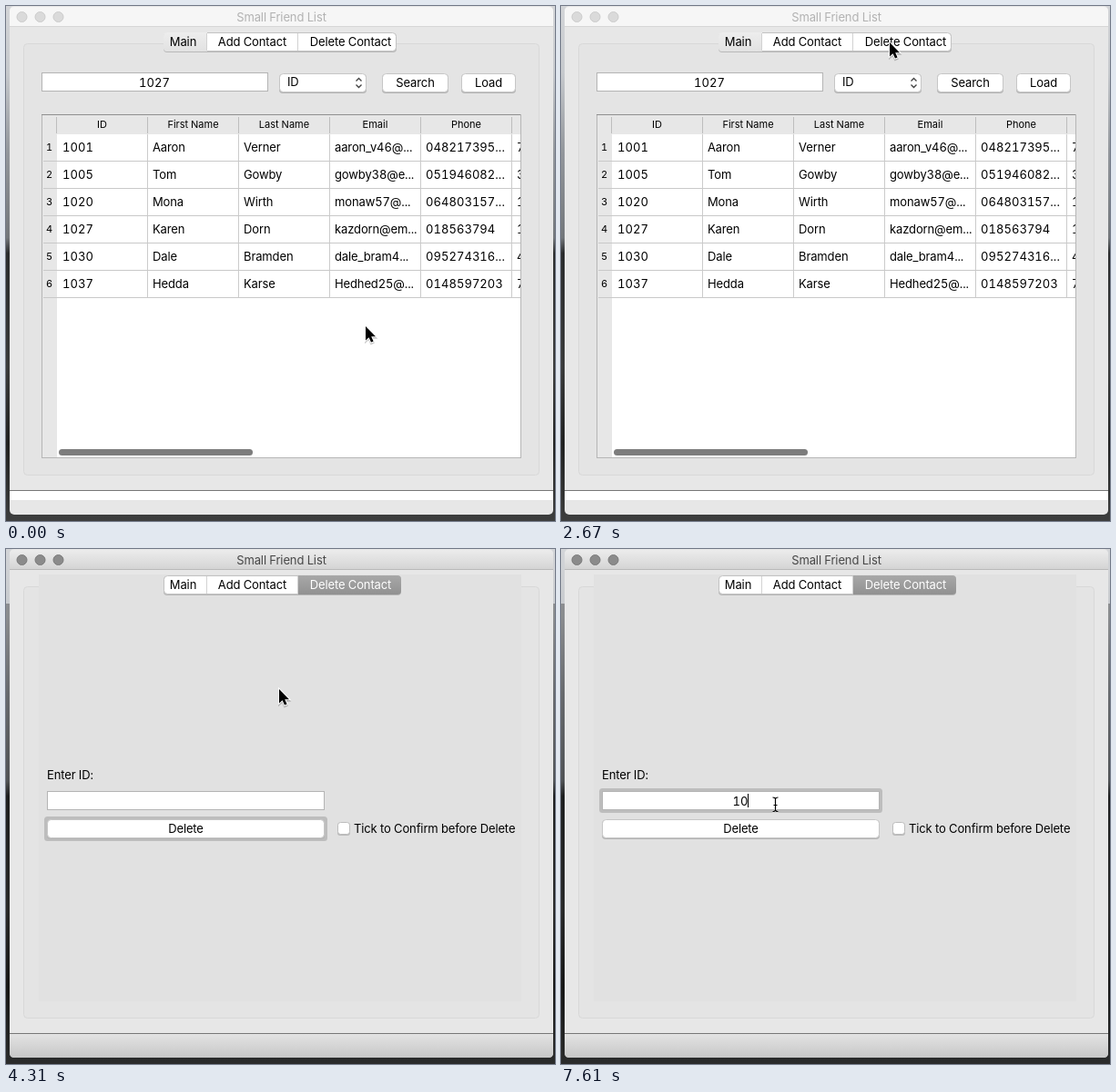
Write an HTML page that moves like this. It is 603 px wide and 566 px high and loops after 8000 ms.

```html
<!DOCTYPE html>
<html lang="en">
<head>
<meta charset="utf-8">
<title>Contacts</title>
<style>
html, body { margin: 0; width: 100%; height: 100%; overflow: hidden; background: #222; }
svg { display: block; width: 603px; height: 566px; }
text {
  font: 13px Inter, "Open Sans", sans-serif;
  font-feature-settings: "tnum";
  letter-spacing: -0.12px;
  white-space: pre;
}
.small { font-size: 11px; letter-spacing: 0; }
.num { letter-spacing: 0.05px; }
.mid { text-anchor: middle; }
</style>
</head>
<body>
<svg id="stage" viewBox="0 0 603 566"></svg>
<script>
const LOOP = 8000;
const stage = document.getElementById('stage');

// Drawing helpers
const rect = (x, y, w, h, fill, extra = '') =>
  `<rect x="${x}" y="${y}" width="${w}" height="${h}" fill="${fill}" ${extra}/>`;
const framed = (x, y, w, h, fill, stroke, r = 0) =>
  rect(x + 0.5, y + 0.5, w - 1, h - 1, fill, `stroke="${stroke}" rx="${r}"`);
const path = (d, fill, extra = '') => `<path d="${d}" fill="${fill}" ${extra}/>`;
const text = (s, x, y, cls = '', fill = '#000') =>
  `<text x="${x}" y="${y}" class="${cls}" fill="${fill}">${s}</text>`;
const label = (s, x, y, fill) => text(s, x, y, 'mid', fill);
const hline = (x, y, w, color) => rect(x, y, w, 1, color);
const vline = (x, y, h, color) => rect(x, y, 1, h, color);
const group = (id, body) => `<g id="${id}">${body}</g>`;
const gradient = (id, stops) =>
  `<linearGradient id="${id}" x2="0" y2="1">` + stops.map(([at, color]) =>
    `<stop offset="${at}" stop-color="${color}"/>`).join('') + '</linearGradient>';

const ring = (x, y, w, h) => rect(x - 3, y - 3, w + 6, h + 6, '#bdbdbd', 'rx="3.5"');
const field = (x, y, w, h) => framed(x, y, w, h, '#fff', '#b4b4b4');
const button = (x, y, w, h, s) =>
  rect(x, y + 1, w, h, '#b3b3b3', 'rx="4"') +
  framed(x, y, w, h, '#fff', '#c6c6c6', 4) +
  (s ? label(s, x + w / 2, y + 15) : '');

// Tab segment with rounding on the left and/or right side
function segment(x1, x2, left, right, fill) {
  const a = left ? 4 : 0, b = right ? 4 : 0;
  return path(`M${x1 + a} 29H${x2 - b}q${b} 0 ${b} ${b}V${50 - b}q0 ${b} ${-b} ${b}` +
    `H${x1 + a}q${-a} 0 ${-a} ${-a}V${29 + a}q0 ${-a} ${a} ${-a}z`, fill);
}

function tabs(x1, x2, mainFill, deleteFill, mainText, deleteText) {
  return rect(x1, 30, x2 - x1, 21, '#b8b8b8', 'rx="4"') +
    framed(x1, 29, x2 - x1, 21, '#fff', '#c2c2c2', 4) +
    (mainFill ? segment(x1, 221, true, false, mainFill) : '') +
    (deleteFill ? segment(321, x2, false, true, deleteFill) : '') +
    vline(220, 30, 19, '#d2d2d2') + vline(320, 30, 19, '#d2d2d2') +
    label('Main', 194.5, 44, mainText) +
    label('Add Contact', 270.5, 44) +
    label('Delete Contact', 378.5, 44, deleteText);
}

function chrome(active) {
  const light = active ? '#8b8b8b' : '#dadada';
  const edge = active ? '#7b7b7b' : '#cccccc';
  return rect(4, 0, 597, 559, '#e7e7e7', 'rx="5"') +
    path('M4 23V6q0 -5 5 -5H596q5 0 5 5V23z', active ? 'url(#bar)' : '#f6f6f6') +
    hline(4, 22, 597, active ? '#b9b9b9' : '#d6d6d6') +
    [17.5, 37.5, 57.5].map(x =>
      `<circle cx="${x}" cy="12" r="5.5" fill="${light}" stroke="${edge}"/>`).join('') +
    label('Small Friend List', 302.5, 17, active ? '#474747' : '#b2b2b2') +
    framed(19, 41, 567, 475, '#e4e4e4', '#d8d8d8', 4) +
    (active
      ? path('M4 533H601V554q0 5 -5 5H9q-5 0 -5 -5z', 'url(#foot)')
      : rect(4, 533, 597, 10, '#fff')) +
    hline(4, 532, 597, '#777');
}

const heads = ['ID', 'First Name', 'Last Name', 'Email', 'Phone'];
const people = [
  ['1001', 'Aaron', 'Verner', 'aaron_v46@...', '048217395...', '7'],
  ['1005', 'Tom', 'Gowby', 'gowby38@e...', '051946082...', '3'],
  ['1020', 'Mona', 'Wirth', 'monaw57@...', '064803157...', '1'],
  ['1027', 'Karen', 'Dorn', 'kazdorn@em...', '018563794', '1'],
  ['1030', 'Dale', 'Bramden', 'dale_bram4...', '095274316...', '4'],
  ['1037', 'Hedda', 'Karse', 'Hedhed25@...', '0148597203', '7']
];

function table() {
  let out = framed(39, 119, 527, 378, '#fff', '#b6b6b6') +
    rect(40, 120, 525, 21, '#e7e7e7') + rect(40, 120, 16, 376, '#e7e7e7') +
    hline(39, 119, 527, '#8f8f8f');
  for (let c = 0; c < 6; c++) {
    const x = 55 + 100 * c;
    out += vline(x, 122, 18, '#bdbdbd');
    if (c) out += vline(x, 141, 180, '#cbcbcb');
    if (heads[c]) out += text(heads[c], x + 50.5, 134, 'small mid');
  }
  people.forEach((person, r) => {
    const y = 160 + 30 * r;
    out += hline(41, y + 10, 524, '#c9c9c9') + text(r + 1, 47.5, y - 1, 'small mid');
    person.forEach((s, c) => {
      out += text(s, c ? 61 + 100 * c : 62, y, /^\d/.test(s) ? 'num' : '');
    });
  });
  return `<g clip-path="url(#tableClip)">${out}</g>` +
    vline(565, 119, 378, '#b6b6b6') +
    rect(58, 487, 213, 7, '#7d7d7d', 'rx="3.5"');
}

function mainPane(active) {
  const arrows = `fill="none" stroke="${active ? '#fff' : '#444'}" stroke-width="1.4"`;
  return (active
      ? tabs(170, 429, 'url(#picked)', 'url(#pressed)', '#fff', '#000')
      : tabs(173, 429, 'url(#soft)', '', '#000', '#000')) +
    (active ? ring(39, 73, 249, 21) : '') +
    field(39, 73, 249, 21) +
    text('1027', 163, 89, 'mid num') +
    (active ? vline(179, 76, 15, '#000') : '') +
    button(300, 74, 96, 21) +
    (active ? path('M379 74H392q4 0 4 4V91q0 4 -4 4H379z', 'url(#picked)') : '') +
    `<path d="M384.5 82.5l3 -3 3 3M384.5 86.5l3 3 3 -3" ${arrows}/>` +
    text('ID', 309, 88) +
    button(413, 74, 73, 21, 'Search') +
    button(500, 74, 60, 21, 'Load') +
    table();
}

function deletePane() {
  return rect(36, 28, 530, 469, '#e1e1e1') +
    tabs(173, 434, '', 'url(#picked)', '#000', '#fff') +
    text('Enter ID:', 45, 253) +
    group('fieldRing', ring(45, 266, 305, 21)) +
    group('buttonRing', ring(45, 297, 305, 21)) +
    field(45, 266, 305, 21) +
    button(45, 297, 305, 21, 'Delete') +
    `<text id="typed" class="mid num" x="197" y="282"></text>` +
    group('caret', vline(0, 269, 15, '#000')) +
    rect(364, 301, 14, 14, '#b9b9b9', 'rx="3"') +
    framed(364, 300, 14, 14, '#fff', '#bdbdbd', 3) +
    text('Tick to Confirm before Delete', 382, 312);
}

const arrowShape = 'M0 0V15.5L3.6 12.2 6 17.6 8.6 16.5 6.2 11.2H11z';
const beamShape = 'M-3 -7.5Q0 -7.5 0 -5.5Q0 -7.5 3 -7.5M0 -5.5V6M-3 8Q0 8 0 6Q0 8 3 8M-2 1H2';

stage.innerHTML = '<defs>' +
  gradient('sky', [[0, '#d3d5d8'], [0.13, '#c6c9cd'], [0.28, '#94989d'], [0.45, '#73777b'],
    [0.48, '#2a2c2d'], [0.7, '#3a3b3b'], [0.85, '#202121'], [1, '#3d3e3e']]) +
  gradient('bar', [[0, '#ececec'], [0.5, '#e0e0e0'], [1, '#d3d3d3']]) +
  gradient('foot', [[0, '#e3e3e3'], [1, '#c7c7c7']]) +
  gradient('soft', [[0, '#ededed'], [1, '#e2e2e2']]) +
  gradient('picked', [[0, '#a8a8a8'], [1, '#919191']]) +
  gradient('pressed', [[0, '#7c7c7e'], [1, '#656567']]) +
  '<clipPath id="tableClip"><rect x="39" y="119" width="527" height="378"/></clipPath></defs>' +
  rect(0, 0, 603, 566, 'url(#sky)') +
  group('shade', rect(0, 60, 603, 506, '#000', 'opacity="0.3"')) +
  group('idle', chrome(false) + mainPane(false)) +
  group('press', chrome(true) + mainPane(true)) +
  group('remove', chrome(true) + deletePane()) +
  group('arrow',
    path(arrowShape, '#000', 'opacity="0.2" transform="translate(0 1.5)" stroke="#000" stroke-width="2"') +
    path(arrowShape, '#000', 'stroke="#fff" stroke-width="1.8" paint-order="stroke"')) +
  group('beam',
    path(beamShape, 'none', 'stroke="#fff" stroke-width="2.6" opacity="0.8"') +
    path(beamShape, 'none', 'stroke="#000" stroke-width="1.2"'));

// Pointer stops: time, x, y
const stops = [
  [0, 395, 352], [450, 354, 342], [600, 272, 330], [750, 182, 317], [890, 106, 307],
  [1040, 72, 303], [1180, 64, 306], [1330, 70, 312], [1480, 84, 314],
  [1630, 104, 307], [1780, 146, 284], [1930, 195, 234], [2080, 240, 165],
  [2220, 280, 106], [2370, 322, 62], [2520, 351, 46], [2670, 361, 40],
  [4020, 350, 72], [4170, 300, 154], [4320, 250, 245], [4460, 235.5, 280.5]
];
// Field states: time, typed text, caret position (0 = hidden)
const typing = [
  [0, '', 0], [5510, '', 196], [5960, '', 0], [6560, '', 196],
  [7010, '', 0], [7160, '1', 200], [7610, '10', 205]
];
const FOCUS = 5510, ACTIVE = 3420, SWITCH = 3570, OVER_FIELD = 4460;

const parts = {};
stage.querySelectorAll('[id]').forEach(el => { parts[el.id] = el; });
const show = (id, on) => { parts[id].style.display = on ? '' : 'none'; };
const place = (id, x, y) => parts[id].setAttribute('transform', `translate(${x} ${y})`);
const current = (steps, t) => steps.filter(s => s[0] <= t).pop();

function draw(t) {
  show('shade', t >= ACTIVE);
  show('idle', t < ACTIVE);
  show('press', t >= ACTIVE && t < SWITCH);
  show('remove', t >= SWITCH);
  show('fieldRing', t >= FOCUS);
  show('buttonRing', t < FOCUS);

  const [, x, y] = current(stops, t);
  show('arrow', t < OVER_FIELD);
  show('beam', t >= OVER_FIELD);
  place('arrow', x, y);
  place('beam', x, y);

  const [, typed, caretX] = current(typing, t);
  parts.typed.textContent = typed;
  show('caret', caretX > 0);
  place('caret', caretX, 0);
}

const start = performance.now();
function tick() {
  draw((performance.now() - start) % LOOP);
  requestAnimationFrame(tick);
}
tick();
</script>
</body>
</html>
```
